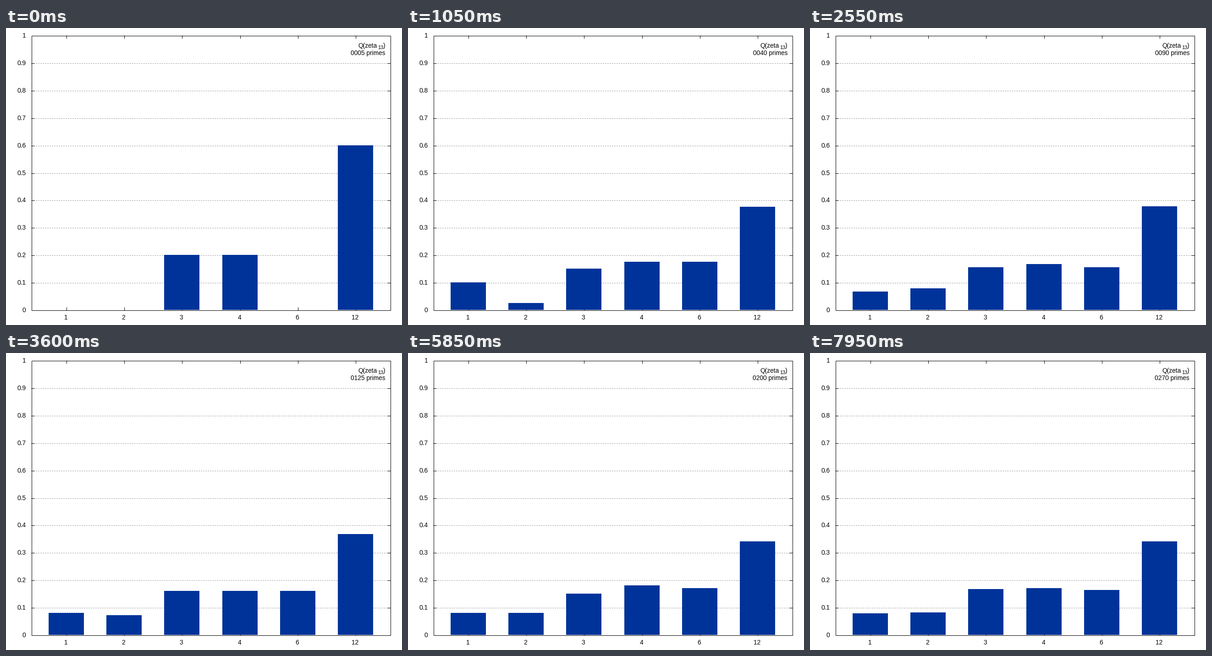
Animation, 864 px wide and 648 px high, one loop 8 s. Source, as a matplotlib script:

```python
import matplotlib.pyplot as plt
from matplotlib.animation import FuncAnimation
from matplotlib.patches import Rectangle

WIDTH, HEIGHT, DPI = 864, 648, 72
LEFT, RIGHT, TOP, BOTTOM = 55, 838, 16, 615
TICK = 7
FONT = 13.75
MODULUS = 13
ORDERS = [1, 2, 3, 4, 6, 12]
STEP = (RIGHT - LEFT) / 6.2
FRAME_MS, LOOP_MS, HOLD = 50, 8000, 3
FRAMES = LOOP_MS // FRAME_MS
PRIMES_PER_STEP = 5


def unramified_primes(count):
    """First primes that do not divide the modulus."""
    found, n = [], 2
    while len(found) < count:
        if n != MODULUS and all(n % d for d in range(2, int(n ** 0.5) + 1)):
            found.append(n)
        n += 1
    return found


def order(p):
    return next(k for k in ORDERS if pow(p, k, MODULUS) == 1)


prime_orders = [order(p) for p in
                unramified_primes(PRIMES_PER_STEP * ((FRAMES - 1) // HOLD + 1))]

plt.rcParams["font.family"] = "Liberation Sans"
fig = plt.figure(figsize=(WIDTH / DPI, HEIGHT / DPI), dpi=DPI, facecolor="white")
ax = fig.add_axes([0, 0, 1, 1])
ax.set_xlim(0, WIDTH)
ax.set_ylim(HEIGHT, 0)
ax.axis("off")


def row(value):
    return round(BOTTOM - value * (BOTTOM - TOP))


def line(x0, y0, x1, y1, color="black", z=2, **style):
    ax.plot([x0, x1], [y0, y1], color=color, lw=1, zorder=z,
            solid_capstyle="butt", dash_capstyle="butt", **style)


def label(x, baseline, text, align="right", size=FONT):
    return ax.text(x, baseline, text, ha=align, va="baseline",
                   fontsize=size, color="black", zorder=5)


# Horizontal grid, side ticks and their labels
for i in range(11):
    y = row(i / 10)
    if 0 < i < 10:
        line(LEFT, y + 0.5, RIGHT, y + 0.5, "#a0a0a0", 1,
             linestyle=(0, (2, 2)), antialiased=False)
        line(LEFT, y + 0.5, LEFT + TICK, y + 0.5)
        line(RIGHT + 1 - TICK, y + 0.5, RIGHT + 1, y + 0.5)
    label(43.5, y + 5, f"{i / 10:g}")

# Bars with their ticks and labels
bars = []
for i, k in enumerate(ORDERS):
    x = int(LEFT + 0.5 + STEP * (i + 0.6))
    line(x + 0.5, TOP, x + 0.5, TOP + TICK)
    line(x + 0.5, BOTTOM + 1 - TICK, x + 0.5, BOTTOM + 1)
    label(x - 0.5, 636, str(k), "center")
    bar = Rectangle((int(LEFT + 0.5 + STEP * (i + 0.3)), BOTTOM), 77, 0,
                    facecolor="#003399", lw=0, antialiased=False, zorder=3)
    bars.append(ax.add_patch(bar))

ax.add_patch(Rectangle((LEFT + 0.5, TOP + 0.5), RIGHT - LEFT, BOTTOM - TOP,
                       fill=False, edgecolor="black", lw=1, zorder=4))

label(809.5, 43, "Q(zeta")
label(823, 46, "13", size=FONT * 0.8)
label(828, 43, ")")
counter = label(828, 59, "")


def update(frame):
    count = PRIMES_PER_STEP * (frame // HOLD + 1)
    seen = prime_orders[:count]
    for bar, k in zip(bars, ORDERS):
        top = row(seen.count(k) / count)
        bar.set_y(top)
        bar.set_height(BOTTOM - top)
    counter.set_text(f"{count:04d} primes")
    return bars + [counter]


anim = FuncAnimation(fig, update, frames=FRAMES, interval=FRAME_MS,
                     repeat=True, repeat_delay=0, blit=False)
plt.show()
```
